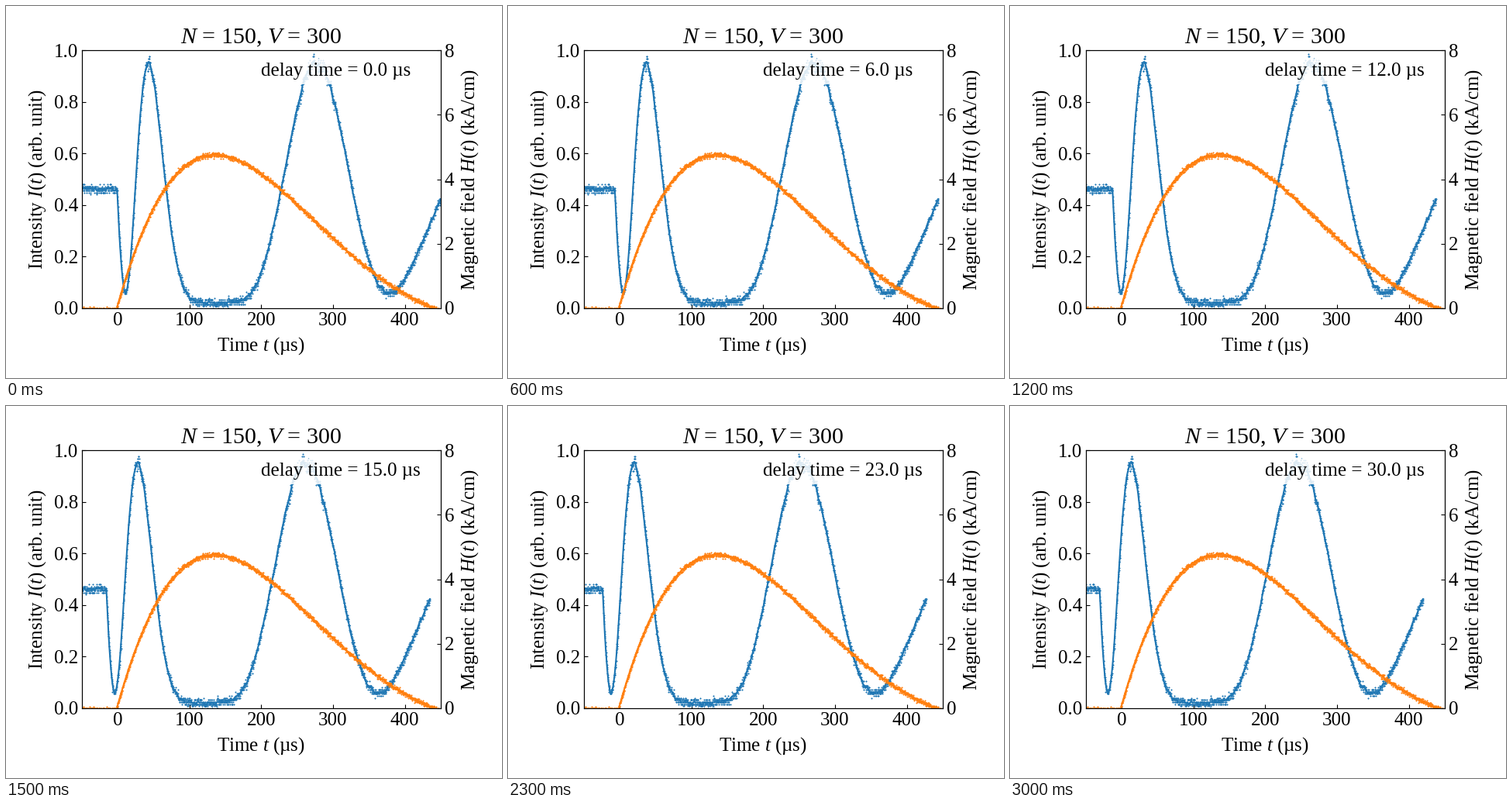
A matplotlib script for the animation above (3100 ms loop, 640 by 480 pixels).

```python
import numpy as np
import matplotlib.pyplot as plt
from matplotlib.animation import FuncAnimation

W, H, DPI = 640, 480, 100
LEFT, RIGHT, TOP, BOTTOM = 98, 560.8, 57, 390
FRAMES, STEP_MS = 31, 100
PEAK = 4.757  # highest field, kA/cm

plt.rcParams.update({
    "font.family": "Liberation Serif",
    "font.size": 18,
    "mathtext.fontset": "custom",
    "mathtext.rm": "Liberation Serif",
    "mathtext.it": "Liberation Serif:italic",
    "xtick.direction": "in",
    "ytick.direction": "in",
})

rng = np.random.default_rng(7)


def pulse(u):
    """Damped sine: the field u µs after the discharge starts."""
    return 11.19 * np.exp(-u / 205.6) * np.sin(np.pi * u / 441.5)


def measure(smooth, spread, level):
    """Noisy readings rounded to the steps of the digitizer."""
    noisy = smooth + rng.normal(size=smooth.size) * spread
    return np.round(noisy / level) * level


def field(t):
    u = t + 1.5
    smooth = np.where(u > 0, pulse(u), -0.03)
    return smooth, measure(smooth, np.where(u > 0, 0.036, 0.028), 0.04)


def intensity(t):
    """Light fringes: the phase grows linearly with the delayed field."""
    h = pulse(np.maximum(t - 0.6, -1.56))
    phase = np.minimum(1.633 * (h - 0.775), 2 * np.pi)
    smooth = 0.5075 - 0.4475 * np.cos(phase) - 0.039 * (h / PEAK) ** 4
    bright = smooth > 0.8
    drift = np.convolve(rng.normal(size=t.size), np.hanning(27) / 13, "same")
    smooth = smooth + drift * np.where(bright, 0.025, 0.01)
    return smooth, measure(smooth, np.where(bright, 0.014, 0.008), 0.008)


time = np.arange(-60, 450.01, 0.25)

fig = plt.figure(figsize=(W / DPI, H / DPI), dpi=DPI, facecolor="white")
ax = fig.add_axes([LEFT / W, 1 - BOTTOM / H,
                   (RIGHT - LEFT) / W, (BOTTOM - TOP) / H])
ax2 = ax.twinx()


def draw(axes, curve, color):
    smooth, points = curve
    dots, = axes.plot(time, points, "+", color=color, ms=2, mew=0.8)
    line, = axes.plot(time, smooth, color=color, lw=1.5)
    return dots, line


def label(x, y, text, rotation=0, size=18):
    """Centred text with its baseline at a pixel position from the top left."""
    fig.text(x / W, 1 - y / H, text, ha="center", va="baseline", size=size,
             rotation=rotation, rotation_mode="anchor")


moving = draw(ax, intensity(time), "tab:blue")
draw(ax2, field(time), "tab:orange")

ax.set(xlim=(-50, 450), ylim=(0, 1), xticks=range(0, 401, 100))
ax2.set(ylim=(0, 8), yticks=range(0, 9, 2))

middle = (LEFT + RIGHT) / 2
label(middle, 48, "$N$ = 150, $V$ = 300", size=21.6)
label(middle, 445, "Time $t$ (µs)")
label(47, 223.5, "Intensity $I(t)$ (arb. unit)", 90)
label(605, 223.5, "Magnetic field $H(t)$ (kA/cm)", 90)

delay_text = ax.text(200, 0.9, "", bbox=dict(facecolor="white", alpha=0.85,
                                             edgecolor="none"))


def update(delay):
    for artist in moving:
        artist.set_xdata(time - delay)
    delay_text.set_text(f"delay time = {delay:.1f} µs")
    return (*moving, delay_text)


anim = FuncAnimation(fig, update, frames=FRAMES, interval=STEP_MS,
                     repeat=True, repeat_delay=0)
plt.show()
```
